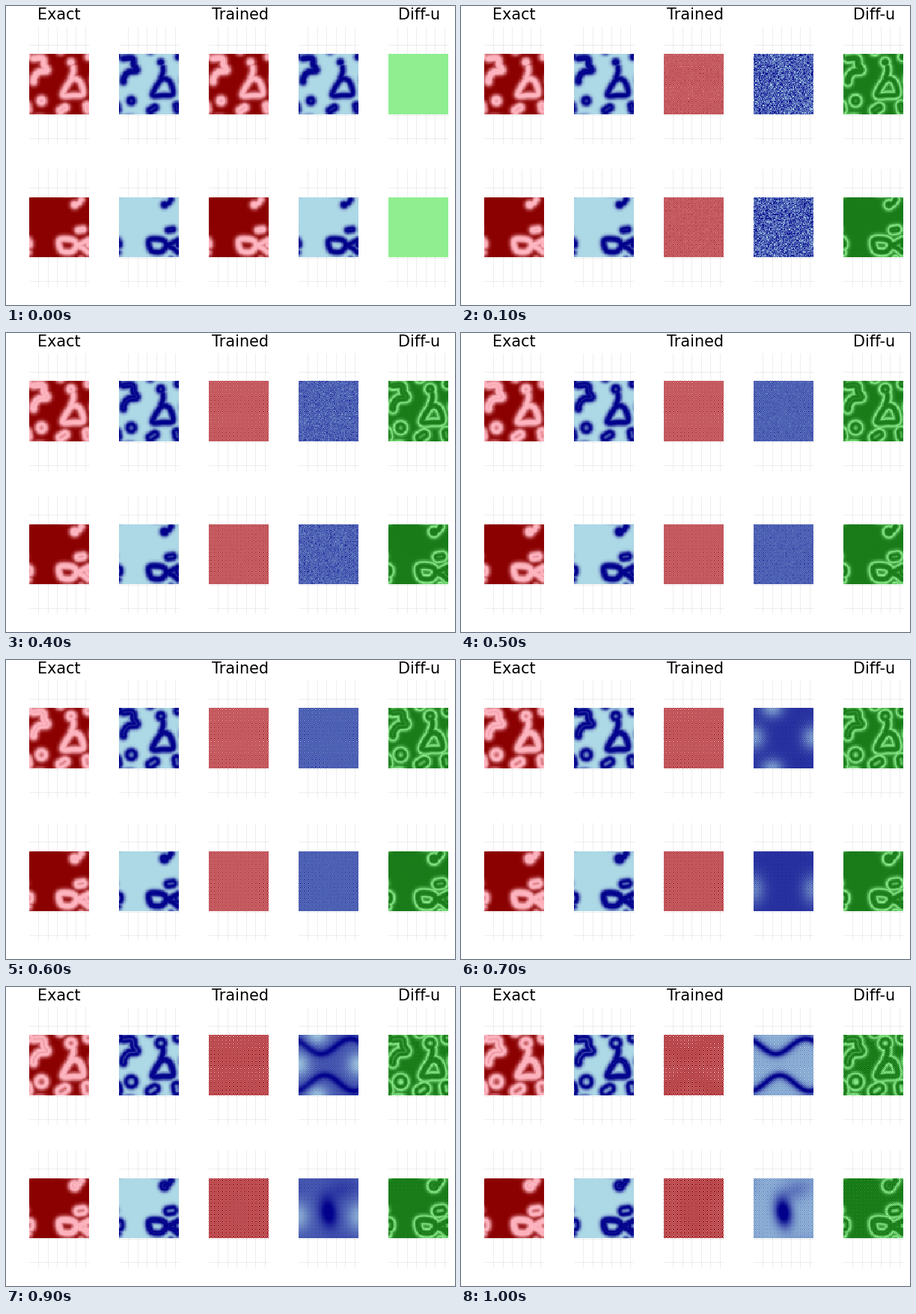
A matplotlib script that plays this animation: 600 by 400 pixels, repeating every 1.1 s.

```python
import numpy as np
import matplotlib.pyplot as plt
from matplotlib.animation import FuncAnimation
from matplotlib.colors import LinearSegmentedColormap

W, H, DPI = 600, 400, 100
FRAMES, STEP = 11, 100
N, SIDE = 64, 80
X0, Y0 = [31.4 + 120 * i for i in range(5)], [65.4, 256]
CELL = SIDE / N

axis = (np.arange(N) + 0.5) * CELL
X, Y = np.meshgrid(axis, axis)
CHECK = 1 - 2 * (np.indices((N, N)).sum(0) % 2)


def cmap(a, b):
    return LinearSegmentedColormap.from_list(a + b, [a, b])


RED = cmap("lightpink", "darkred")
BLUE = cmap("lightblue", "darkblue")
GREEN = cmap("lightgreen", "darkgreen")


def wrap(d):
    return d - SIDE * np.round(d / SIDE)


def mix(a, b, t):
    return a * (1 - t) + b * t


def distance(pts):
    dx = wrap(X[..., None] - pts[:, 0])
    dy = wrap(Y[..., None] - pts[:, 1])
    return np.sqrt((dx**2 + dy**2).min(-1))


def spline(pts, closed):
    """Catmull-Rom samples through the points."""
    p = np.array(pts, float)
    if len(p) == 1:
        return p
    p = np.vstack([p[-1:], p, p[:2]] if closed else [p[:1], p, p[-1:]])
    t = np.linspace(0, 1, 16)[:, None]
    return np.vstack([
        0.5 * (2 * b + (c - a) * t + (2 * a - 5 * b + 4 * c - d) * t**2 + (3 * b - a - 3 * c + d) * t**3)
        for a, b, c, d in zip(p, p[1:], p[2:], p[3:])])


class Cell:
    """A skeleton whose rim moves outward from radius r at speed grow."""

    def __init__(self, r, grow, *pts, closed=False):
        self.r, self.grow = r, grow
        self.dist = distance(spline(pts, closed))

    def level(self, t, width, hollow):
        gap = self.dist - self.r - self.grow * t
        edge = np.exp(-(gap / width)**2)
        return np.where(gap > 0, edge, 1 - hollow * (1 - edge))


TOP = [
    Cell(1.6, 1.2, (6, 6), (18, 6), (20, 15), (24, 22), (13, 24), (7, 31), (6, 37)),
    Cell(2.0, 4.0, (56, 11)),
    Cell(0.8, 0.4, (59, 18), (59, 24), (56, 32)),
    Cell(0.9, 0.6, (57, 34), (45, 54), (59, 55), (72, 53), (68, 37), closed=True),
    Cell(3.7, 3.5, (16.5, 62)),
    Cell(2.8, 2.4, (42, 75), (48, 71)),
    Cell(2.5, 2.6, (77, 68), (78, 74)),
    Cell(1.5, 3.5, (79, 4)),
]
LOW = [
    Cell(2.2, 3.0, (61, 10)),
    Cell(0.8, 0.8, (61, 10), (66, 8), (70, 3)),
    Cell(1.0, 0.6, (41, 57), (58, 57), (63, 65), (56, 73), (43, 71), closed=True),
    Cell(0.8, 0.6, (64, 64), (72, 61), (79, 57)),
    Cell(0.8, 0.6, (64, 65), (72, 68), (79, 74)),
    Cell(1.8, 2.8, (66, 44), (72, 43)),
    Cell(1.8, 3.6, (0, 61), (0, 64)),
]


def spot(x, y, sx, sy, tilt=0):
    dx, dy = wrap(X - x), wrap(Y - y)
    c, s = np.cos(tilt), np.sin(tilt)
    return np.exp(-((dx * c + dy * s) / sx)**2 - ((dy * c - dx * s) / sy)**2)


def wave(y, height, crest):
    x = np.linspace(0, SIDE, 120)
    return np.column_stack([x, y + height * np.cos(2 * np.pi * (x - crest) / SIDE)])


band = distance(np.vstack([wave(15, 10, 30), wave(64, -10.5, 35)]))
SPOTS = [np.clip(spot(0, 39, 15, 16) + spot(25, 0, 15, 13), 0, 1), spot(0, 51, 15, 20)]
DARK = [0.7 * np.exp(-(band / 4.2)**2) + 0.3 * np.exp(-(band / 8)**2),
        np.clip(1.25 * spot(40, 46, 11, 19, -0.15) + 0.3 * spot(56, 16, 24, 14, -0.4), 0, 1)]


def exact(cells, t):
    v = np.maximum.reduce([c.level(t, 3.9, 0.5 + 0.4 * t) for c in cells])
    u = 1 - 0.76 * np.maximum.reduce([c.level(t, 4.7, 0.35 + 0.35 * t) for c in cells])
    return u, v


def trained(row, n):
    """Normalised red and blue fields, plus the raw checker ripple."""
    rng = np.random.default_rng(10 * n + row)
    late = np.clip((n - 6) / 4, 0, 1)
    amp = mix(0.12 + 0.04 * n * SPOTS[row], 0.46 * (1 - 0.9 * DARK[row]), late**2)
    red = 0.5 + 0.1 * late + amp * CHECK + rng.normal(0, 0.05 * np.exp(-n / 3), (N, N))

    grain = rng.normal(0, 0.24 * np.exp(-((n - 1) / 3)**2), (N, N))
    blue = 0.55 + grain + (0.08 + 0.03 * n * SPOTS[row]) * CHECK
    smooth = 1 - (0.95 - 0.2 * row) * SPOTS[row] + 0.03 * CHECK
    final = 0.2 + 0.8 * DARK[row] + 0.15 * (1 - DARK[row]) * CHECK
    blue = mix(blue, smooth, np.clip((n - 6) / 2, 0, 1))
    blue = mix(blue, final, np.clip((n - 8) / 2, 0, 1))
    return red, blue, amp * CHECK * (0.02 + 0.1 * (n / 10)**2)


def fields(row, n):
    u, v = exact((TOP, LOW)[row], n / 10)
    red = (u - 0.24) / 0.76
    if n == 0:
        return red, v, red, v, np.zeros((N, N))
    r, b, ripple = trained(row, n)
    return red, v, r, b, np.abs(u - 0.62 - ripple) / 0.46


fig = plt.figure(figsize=(W / DPI, H / DPI), dpi=DPI, facecolor="white")
ax = fig.add_axes([0, 0, 1, 1])
ax.axis("off")

images = []
grid = dict(color="black", alpha=0.08, lw=0.6, zorder=0)
for y in Y0:
    bottom = y + SIDE
    for x, cm in zip(X0, [RED, BLUE, RED, BLUE, GREEN]):
        for tick in range(10, 61, 10):
            gx = x + (tick - 0.5) * CELL
            ax.plot([gx, gx], [y - 38.5, bottom + 39], **grid)
        for tick in (-25, 0, 75):
            gy = bottom - (tick - 0.5) * CELL
            ax.plot([x, x + SIDE], [gy, gy], **grid)
        images.append(ax.imshow(np.zeros((N, N)), cmap=cm, vmin=0, vmax=1, zorder=1,
                                extent=(x, x + SIDE, bottom, y), interpolation="nearest"))

for x, label in [(71.3, "Exact"), (312.6, "Trained"), (551.8, "Diff-u")]:
    ax.text(x, 18, label, ha="center", va="baseline", family="DejaVu Sans",
            size=20.8 * 72 / DPI, color="black")

ax.set_xlim(0, W)
ax.set_ylim(H, 0)
ax.set_aspect("auto")


def update(n):
    for im, data in zip(images, fields(0, n) + fields(1, n)):
        im.set_data(np.clip(data, 0, 1))
    return images


anim = FuncAnimation(fig, update, frames=FRAMES, interval=STEP, repeat=True, repeat_delay=0)
plt.show()
```
